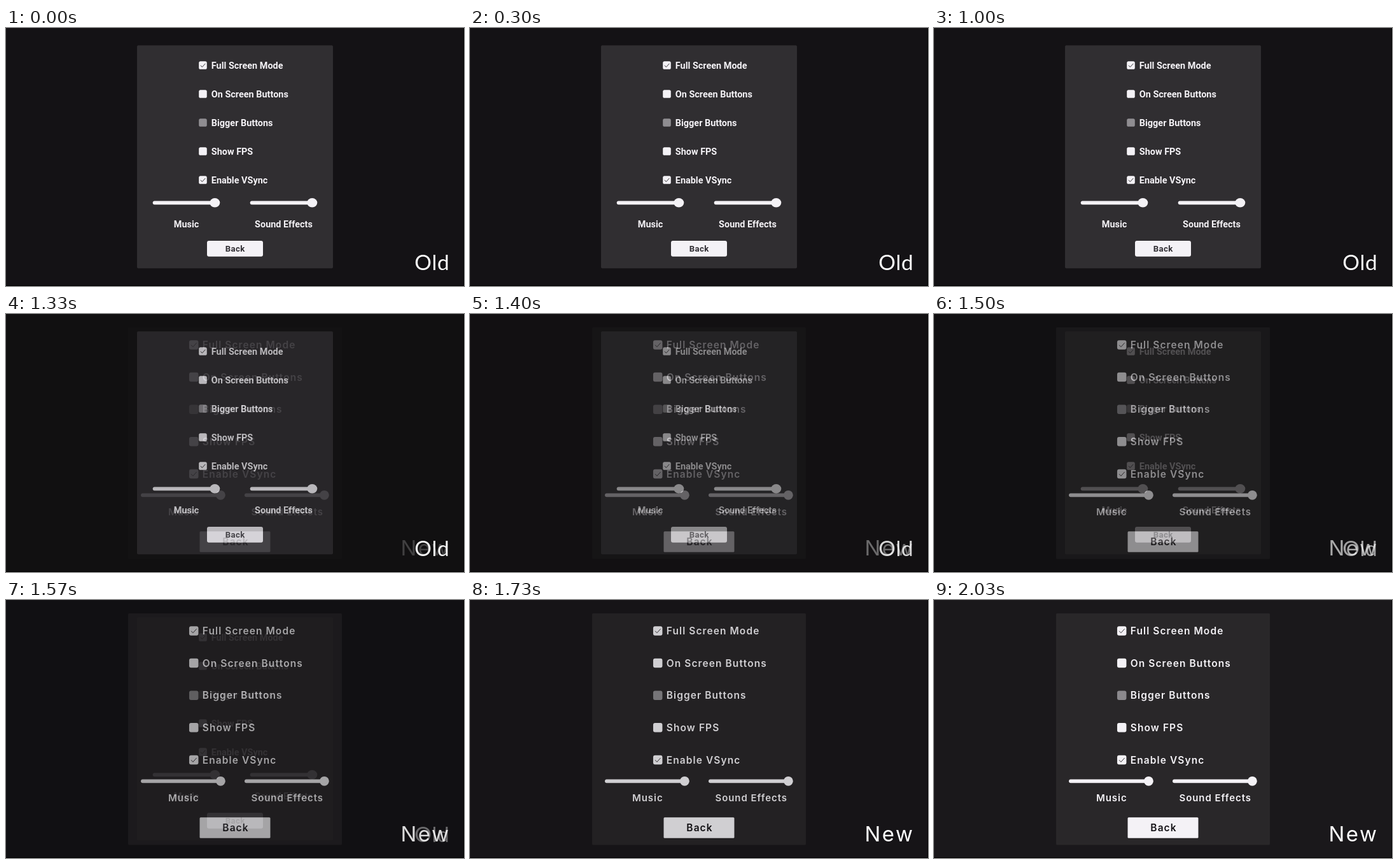
Write an HTML page that moves like this. It is 720 px wide and 405 px high and loops after 3 s.

```html
<!DOCTYPE html>
<html lang="en">
<head>
<meta charset="utf-8">
<title>Settings menu, old and new</title>
<style>
  html, body { margin: 0; width: 100%; height: 100%; overflow: hidden; background: #000; }
  svg { display: block; width: 100vw; height: 100vh; }
  text { fill: #f4f2f6; }

  .before text { font: 700 14.45px Roboto, sans-serif; }
  .after text { font: 600 15.5px Inter, sans-serif; letter-spacing: 1.08px; }
  .after .caption { font-size: 15px; letter-spacing: .95px; }
  .before .back { font-size: 13.2px; letter-spacing: .4px; fill: #302e33; }
  .after .back { fill: #151317; }
  .tag { fill: #fff; }
  .tick { fill: none; stroke: #38363a; stroke-width: 1; }

  .anim { animation: 3s linear infinite; }
  .before { animation-name: leave; }
  .before .scene { animation-name: dim; }
  .after .scene { animation-name: brighten; }
  .tag-old { animation-name: tag-out; font: 400 33.4px Lato, sans-serif; letter-spacing: .7px; }
  .tag-new { animation-name: tag-in; font: 400 33px Inter, sans-serif; letter-spacing: 2.4px; }

  @keyframes leave {
    0%, 34% { opacity: 1; }
    39% { opacity: .97; }
    44.33% { opacity: .83; }
    49% { opacity: .38; }
    52.33% { opacity: .13; }
    57%, 100% { opacity: 0; }
  }
  @keyframes dim {
    0%, 33.5% { opacity: 1; }
    44.33% { opacity: .9; }
    49% { opacity: .82; }
    57%, 100% { opacity: .76; }
  }
  @keyframes brighten {
    0%, 49% { opacity: .78; }
    52.33% { opacity: .76; }
    65.5%, 100% { opacity: 1; }
  }
  @keyframes tag-out {
    0%, 39% { opacity: 1; }
    44.33% { opacity: .97; }
    49% { opacity: .7; }
    52.33% { opacity: .38; }
    57%, 100% { opacity: 0; }
  }
  @keyframes tag-in {
    0%, 38% { opacity: 0; }
    44.33% { opacity: .2; }
    49% { opacity: .55; }
    52.33% { opacity: .85; }
    57%, 100% { opacity: 1; }
  }
</style>
</head>
<body>
<svg id="stage" viewBox="0 0 720 405" preserveAspectRatio="none"></svg>
<script>
  const LIGHT = '#f4f2f6';
  const OPTIONS = [
    ['Full Screen Mode', 'on'],
    ['On Screen Buttons', 'off'],
    ['Bigger Buttons', 'disabled'],
    ['Show FPS', 'off'],
    ['Enable VSync', 'on']
  ];

  const rect = (x, y, w, h, r, fill) =>
    `<rect x="${x}" y="${y}" width="${w}" height="${h}" rx="${r}" fill="${fill}"/>`;

  const label = (x, y, str, cls = '', anchor = 'start') =>
    `<text x="${x}" y="${y}" class="${cls}" text-anchor="${anchor}">${str}</text>`;

  function checkbox(cx, cy, size, state, muted) {
    const k = size / 12.5;
    const fill = state === 'disabled' ? muted : LIGHT;
    const box = rect(cx - size / 2, cy - size / 2, size, size, 2.6 * k, fill);
    if (state !== 'on') return box;
    return box + `<path class="tick" d="M${cx - 3.6 * k} ${cy + .2 * k}l${2.5 * k} ${2.6 * k}l${4.9 * k} ${-5.4 * k}"/>`;
  }

  const slider = (x, knobX, y, rx, ry) =>
    rect(x, y - 2.9, knobX - x, 5.8, 2.9, LIGHT) +
    `<ellipse cx="${knobX}" cy="${y}" rx="${rx}" ry="${ry}" fill="${LIGHT}"/>`;

  function menu(m) {
    const rows = OPTIONS.map(([str, state], i) => {
      const y = m.rowY + i * m.step;
      return checkbox(m.boxX, y, m.boxSize, state, m.muted) +
        label(m.textX, y + m.drop, str);
    }).join('');
    const sliders = m.sliders.map(([x, knob]) =>
      slider(x, knob, m.sliderY, ...m.knob)).join('');
    const captions = ['Music', 'Sound Effects'].map((str, i) =>
      label(m.captionX[i], m.captionY, str, 'caption', 'middle')).join('');
    return `<g class="anim ${m.cls}">${rect(0, 0, 720, 405, 0, '#000')}
      <g class="anim scene">
        ${rect(0, 0, 719, 404, 0, m.bg)}${rect(...m.panel)}
        ${rows}${sliders}${captions}
        ${rect(...m.button, LIGHT)}${label(m.backX, m.backY, 'Back', 'back', 'middle')}
      </g></g>`;
  }

  const before = {
    cls: 'before', bg: '#141215', muted: '#8f8d91',
    panel: [206, 27.3, 308, 350, 2, '#302e31'],
    rowY: 58.5, step: 45, boxX: 309.5, boxSize: 12.6, textX: 322.8, drop: 5.1,
    sliderY: 274.3, sliders: [[230.7, 328.3], [383.7, 481.3]], knob: [8, 7.3],
    captionX: [283.5, 436.5], captionY: 312.6,
    button: [316, 334, 88, 24.8, 3], backX: 360.2, backY: 351.2
  };

  const after = {
    cls: 'after', bg: '#1a181b', muted: '#8b898d',
    panel: [192, 21, 336, 363.5, 1.5, '#292729'],
    rowY: 48.4, step: 50.65, boxX: 295.2, boxSize: 14.5, textX: 308.8, drop: 5.7,
    sliderY: 284.3, sliders: [[212, 337.4], [375, 500.4]], knob: [7.4, 7.4],
    captionX: [279.3, 442.2], captionY: 315.6,
    button: [304.5, 341.3, 111, 32.5, 1.5], backX: 361, backY: 363.4
  };

  document.getElementById('stage').innerHTML =
    menu(after) + menu(before) +
    label(620.6, 379.4, 'New', 'anim tag tag-new') +
    label(642.3, 379.8, 'Old', 'anim tag tag-old');
</script>
</body>
</html>
```
